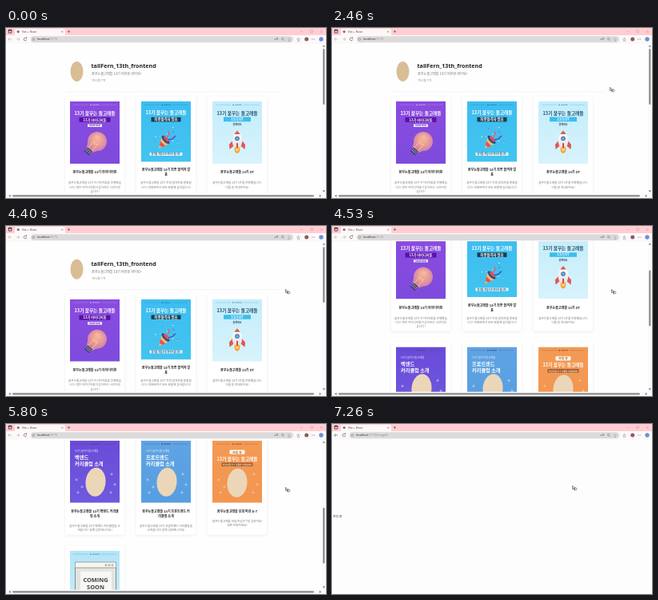
Animation of 400 by 213 pixels, one loop 8 s. Source, as an HTML page with a canvas:

```html
<!DOCTYPE html>
<html lang="ko">
<head>
<meta charset="utf-8">
<title>Vite + React</title>
<style>
html, body { margin: 0; width: 100%; height: 100%; overflow: hidden; background: #fff; }
canvas { display: block; width: 400px; height: 213px; }
</style>
</head>
<body>
<canvas id="stage"></canvas>
<script>
const W = 400, H = 213, LOOP = 8000, STEP = 1000 / 15;
const KR = '"Noto Sans CJK KR", "Noto Sans CJK", "Noto Sans", sans-serif';
const UI = '"Open Sans", "Noto Sans", sans-serif';
const CLUB = '꿈꾸는돌고래들', CLUB_SPACED = '13기 꿈꾸는 돌고래들';
const COLS = [111, 200, 289], ROWS = [92, 230, 368], CARD_H = [124, 124, 113];
const IMG_W = 62, IMG_H = 78, TOP = 19, BOTTOM = 270;

const canvas = document.getElementById('stage');
const dpr = window.devicePixelRatio || 1;
canvas.width = W * dpr;
canvas.height = H * dpr;
const c = canvas.getContext('2d');

// ---------- helpers ----------
function rect(x, y, w, h, fill, r = 0) {
  c.fillStyle = fill;
  c.beginPath();
  if (r) c.roundRect(x, y, w, h, r); else c.rect(x, y, w, h);
  c.fill();
}
function oval(x, y, rx, ry, fill, turn = 0) {
  c.fillStyle = fill;
  c.beginPath();
  c.ellipse(x, y, rx, ry, turn, 0, Math.PI * 2);
  c.fill();
}
function poly(pts, fill) {
  c.fillStyle = fill;
  c.beginPath();
  pts.forEach(([x, y]) => c.lineTo(x, y));
  c.closePath();
  c.fill();
}
function line(pts, color, width = 0.6) {
  c.strokeStyle = color;
  c.lineWidth = width;
  c.beginPath();
  pts.forEach(([x, y], i) => i ? c.lineTo(x, y) : c.moveTo(x, y));
  c.stroke();
}
function ring(x, y, r, color, width = 0.6, from = 0, to = Math.PI * 2) {
  c.strokeStyle = color;
  c.lineWidth = width;
  c.beginPath();
  c.arc(x, y, r, from, to);
  c.stroke();
}
function text(s, x, y, size, color, { weight = 400, align = 'center', font = KR } = {}) {
  c.font = `${weight} ${size}px ${font}`;
  c.textAlign = align;
  c.textBaseline = 'alphabetic';
  c.fillStyle = color;
  c.fillText(s, x, y + size * 0.36);
  return c.measureText(s).width;
}
function fade(y, h, from, to) {
  const g = c.createLinearGradient(0, y, 0, y + h);
  g.addColorStop(0, from);
  g.addColorStop(1, to);
  return g;
}
function rand(seed) {
  const v = Math.sin(seed * 127.1) * 43758.5453;
  return v - Math.floor(v);
}
const bold = { weight: 700 };

// ---------- motion ----------
// Each move: start, end, value before, value after.
const easeOut = p => 1 - Math.pow(1 - p, 1.8);
const easeBoth = p => p * p * (3 - 2 * p);
function track(t, moves, ease) {
  let v = moves[0][2];
  for (const [a, b, from, to] of moves) {
    if (t >= a) v = from + (to - from) * ease(Math.min(1, (t - a) / (b - a)));
  }
  return v;
}
const scrollAt = t => track(t, [
  [4400, 4733, 0, 130], [5266, 5466, 130, 209], [5800, 6066, 209, BOTTOM]], easeOut);
const pointerX = t => track(t, [
  [333, 600, 392, 347], [3800, 4266, 347, 349], [6533, 6866, 349, 300]], easeBoth);
const pointerY = t => track(t, [
  [333, 600, 2, 74], [3800, 4266, 74, 79], [6533, 6866, 79, 77]], easeBoth);

// ---------- browser frame ----------
function browser(blank) {
  const faint = '#d39ba2';
  rect(0, 0, W, 9.5, '#ffcdd2');
  rect(2.8, 1.8, 4.6, 4.6, '#4a3338', 1);
  rect(3.7, 3.6, 2.8, 2, '#ffe3e6');
  rect(11, 1, 63, 10, '#fdf7f7', 2);
  oval(15.2, 4.6, 1.6, 1.6, '#77708c');
  text('Vite + React', 20, 4.6, 3.4, '#444', { align: 'left', font: UI });
  line([[69.2, 3.6], [71.2, 5.6]], '#555', 0.5);
  line([[71.2, 3.6], [69.2, 5.6]], '#555', 0.5);
  line([[76.8, 4.4], [80.2, 4.4]], '#644');
  line([[78.5, 2.7], [78.5, 6.1]], '#644');
  line([[368, 4.4], [371, 4.4]], faint);
  c.strokeRect(380.8, 3, 2.6, 2.6);
  line([[392.8, 3], [395.8, 6]], faint);
  line([[395.8, 3], [392.8, 6]], faint);

  rect(0, 9, W, 10, '#fdf9f9');
  const arrow = blank ? '#555' : '#aaa';
  line([[7, 14], [2.8, 14]], arrow);
  line([[4.7, 12.1], [2.8, 14], [4.7, 15.9]], arrow);
  const shift = blank ? -9 : 0;
  if (!blank) {
    line([[13, 14], [17, 14]], arrow);
    line([[15.2, 12.1], [17, 14], [15.2, 15.9]], arrow);
  }
  ring(24 + shift, 14, 1.8, '#444', 0.6, 0.2, 5.4);
  poly([[24.8 + shift, 11.8], [26.2 + shift, 11.6], [26 + shift, 13.4]], '#444');

  rect(31 + shift, 10.2, 328 - shift, 7.8, '#dcdadb', 3.9);
  ring(34.5 + shift, 14.1, 1.4, '#666', 0.5);
  const w = text('localhost', 39 + shift, 14.1, 3.7, '#222', { align: 'left', font: UI });
  text(blank ? ':5173/image/2' : ':5173', 39 + shift + w, 14.1, 3.7, '#888', { align: 'left', font: UI });
  text('aあ', 338, 14, 3.4, '#666');
  ring(345.7, 13.6, 1.3, '#666', 0.5);
  line([[346.7, 14.6], [347.9, 15.8]], '#666', 0.5);
  text('☆', 354, 14, 4.4, '#666');

  text('☆', 365.5, 14, 5, '#444', bold);
  oval(375.7, 14, 2.5, 2.5, '#8d5a60');
  for (let i = 0; i < 3; i++) oval(382.4 + i * 1.6, 14, 0.45, 0.45, '#444');
  oval(394, 14, 2.7, 2.7, '#6f8fd6');
  line([[0, 18.9], [W, 18.9]], '#eeeaea', 0.4);
}

function scrollbars(y) {
  rect(394.5, TOP, 5.5, 189, '#fafafa');
  poly([[395.6, 23.6], [399, 23.6], [397.3, 21.4]], '#777');
  poly([[395.6, 203.6], [399, 203.6], [397.3, 205.8]], '#777');
  rect(396.2, 26 + y * 0.377, 2.2, 70, '#8b8b8b', 1.1);
  rect(0, 207.8, W, 5.2, '#fafafa');
  poly([[5.6, 208.7], [5.6, 212], [3.4, 210.3]], '#777');
  poly([[391.8, 208.7], [391.8, 212], [394, 210.3]], '#777');
  rect(8, 209.2, 377, 2.2, '#8b8b8b', 1.1);
}

// ---------- posters: x is the centre, y the top ----------
function backdrop(x, y, from, to, h = IMG_H) {
  rect(x - 31, y, IMG_W, h, fade(y, h, from, to));
}
function topLine(x, y, color) {
  line([[x - 27, y + 4.3], [x - 8, y + 4.3]], color, 0.3);
  line([[x + 8, y + 4.3], [x + 27, y + 4.3]], color, 0.3);
  oval(x - 5, y + 4.3, 0.9, 0.9, color);
  line([[x - 3, y + 4.3], [x + 6, y + 4.3]], color, 0.8);
}
function headline(x, y, color) {
  text(CLUB_SPACED, x, y, 5.7, color, bold);
}
function label(s, x, y, w, h, bg, fg, size, r = 0.5) {
  rect(x - w / 2, y - h / 2, w, h, bg, r);
  text(s, x, y, size, fg, bold);
}
function specks(x, y, n, seed, colors, x0, y0, w, h) {
  for (let i = 0; i < n; i++) {
    const px = x + x0 + rand(seed + i) * w, py = y + y0 + rand(seed + i + 50) * h;
    oval(px, py, 0.9, 0.5, colors[i % colors.length], rand(i) * 3);
  }
}

function ideaPoster(x, y) {
  backdrop(x, y, '#8b4be0', '#7d4bdc');
  topLine(x, y, '#c9aef2');
  headline(x, y + 14.5, '#fff');
  label('13기 아이디어톤', x, y + 23, 39, 6, '#5a12a6', '#fff', 4.2);
  label('IDEATHON', x, y + 30.3, 18, 3.4, '#f4ecff', '#4b2a8a', 2.6);
  c.save();
  c.translate(x + 3, y + 50);
  c.rotate(0.72);
  poly([[-9, 7], [9, 7], [4.5, 15], [-4.5, 15]], '#d889a0');
  const g = c.createRadialGradient(-3, -4, 1, 0, 0, 13);
  g.addColorStop(0, '#f6b99a');
  g.addColorStop(0.55, '#e79a9c');
  g.addColorStop(1, '#cf7fae');
  oval(0, 0, 12, 12, g);
  line([[-3, 13], [-3, 2], [0, 5], [3, 2], [3, 13]], '#ffd36b', 0.8);
  rect(-4.5, 13.5, 9, 6.5, '#463f70', 1.6);
  line([[-4.5, 15.5], [4.5, 15.5]], '#b9b2da', 0.8);
  line([[-4.5, 17.7], [4.5, 17.7]], '#b9b2da', 0.8);
  c.restore();
}

function resultPoster(x, y) {
  backdrop(x, y, '#3dbdf0', '#42c4f0', 75.5);
  topLine(x, y, '#1f7fa8');
  headline(x, y + 14.3, '#fff');
  label('최종합격자 발표', x, y + 22.6, 37, 5.6, '#173f54', '#fff', 4.4);
  specks(x, y, 18, 9, ['#ffd84d', '#f2586a', '#fff', '#4d63d8'], -15, 32, 32, 22);
  poly([[x - 9, y + 59], [x - 5, y + 43], [x + 4, y + 53]], '#e8c25a');
  poly([[x - 8, y + 55], [x - 6.8, y + 50], [x - 1, y + 55.5], [x - 5, y + 57.3]], '#e94c5c');
  oval(x - 0.5, y + 48, 6.6, 2.8, '#2f4796', 0.8);
  oval(x + 0.5, y + 47.2, 4.4, 1.7, '#e94c5c', 0.8);
  line([[x + 1, y + 46], [x + 4, y + 41], [x + 3, y + 37]], '#f2586a', 1.1);
  line([[x + 3, y + 48], [x + 8, y + 47], [x + 12, y + 43]], '#4453b8', 1.4);
  label('합격을 진심으로 축하드립니다!', x, y + 66, 41, 3.9, '#eefaff', '#174a66', 2.9, 1);
}

function rocketPoster(x, y) {
  backdrop(x, y, '#c3edfb', '#d8f3fc');
  topLine(x, y, '#5599bb');
  headline(x, y + 14.5, '#24506c');
  label('13기 OT', x, y + 22.4, 34, 5.6, '#3dbdec', '#fff', 4.2);
  text('함께해요', x, y + 29, 3, '#33556b', bold);
  oval(x, y + 60, 3.4, 5, '#ff9d3c');
  oval(x, y + 59, 1.8, 3.4, '#ffe06a');
  for (const s of [-1, 1]) {
    poly([[x + s * 4, y + 47], [x + s * 10, y + 54], [x + s * 9.5, y + 60], [x + s * 4, y + 55.5]], '#e2574c');
  }
  c.fillStyle = fade(y + 37, 20, '#ffffff', '#dfe5f0');
  c.beginPath();
  c.moveTo(x, y + 37);
  c.bezierCurveTo(x + 7.5, y + 42, x + 7.5, y + 51, x + 4.2, y + 57);
  c.lineTo(x - 4.2, y + 57);
  c.bezierCurveTo(x - 7.5, y + 51, x - 7.5, y + 42, x, y + 37);
  c.fill();
  poly([[x, y + 36.5], [x + 3.8, y + 41], [x - 3.8, y + 41]], '#e2574c');
  oval(x, y + 46.5, 2.8, 2.8, '#52658c');
  oval(x, y + 46.5, 1.8, 1.8, '#55bdee');
  rect(x - 1, y + 52, 2, 7, '#d44a43', 1);
}

function flakes(x, y, color) {
  for (const [dx, dy] of [[-23, 49], [-16, 58], [-21, 65], [21, 42], [25, 55], [20, 65]]) {
    oval(x + dx, y + dy, 1.5, 1.5, color);
  }
}
function mascot(x, y) {
  oval(x, y, 12.5, 18, '#ecd6b8', 0.08);
}
function coursePoster(name, from, to) {
  return (x, y) => {
    backdrop(x, y, from, to);
    topLine(x, y, '#4b3b78');
    const left = { weight: 700, align: 'left' };
    text('13기 ' + CLUB, x - 25, y + 13.3, 3.4, '#eef', { align: 'left' });
    text(name, x - 25, y + 20.8, 6.2, '#fff', left);
    text('커리큘럼 소개', x - 25, y + 29.2, 6.2, '#fff', left);
    flakes(x, y, 'rgba(255,255,255,.4)');
    mascot(x + 1, y + 52);
  };
}
function recruitPoster(x, y) {
  backdrop(x, y, '#f49a55', '#f2954f');
  topLine(x, y, '#8a4a26');
  label('모집 중', x, y + 14.4, 19, 5.2, '#fff7ee', '#b5642f', 3.8, 1);
  headline(x, y + 22.8, '#fff');
  label('모집 마감 D-7 서둘러 지원하세요', x, y + 30, 39, 4.6, '#9d5b30', '#ffe7cf', 2.7);
  flakes(x, y, 'rgba(255,235,210,.4)');
  mascot(x, y + 53);
}
function soonPoster(x, y) {
  backdrop(x, y, '#b3e5f8', '#c9edf8');
  topLine(x, y, '#4d8ba6');
  rect(x - 25, y + 14, 52, 54, '#5e6a70', 1);
  rect(x - 24.3, y + 14.7, 50.6, 52.6, '#e2e4e1', 0.6);
  rect(x - 24.3, y + 14.7, 50.6, 6.6, '#f7f5ec');
  line([[x - 24.3, y + 21.3], [x + 26.3, y + 21.3]], '#5e6a70', 0.6);
  for (let i = 0; i < 3; i++) ring(x + 14 + i * 4, y + 18, 1.1, '#5e6a70', 0.5);
  rect(x - 18, y + 26, 39, 34, '#f7f7f4');
  text('COMING', x + 1, y + 37, 7.4, '#3d4347', { weight: 700, font: UI });
  text('SOON', x + 1, y + 46, 7.4, '#3d4347', { weight: 700, font: UI });
}

// ---------- cards: [column, row, poster, title lines, title y, text lines, text y] ----------
const CARDS = [
  [0, 0, ideaPoster, [CLUB + ' 13기 아이디어톤'], 89,
    [CLUB + ' 13기 아이디어톤을 진행했습', '니다. 멋진 아이디어들이 쏟아지는 시간이었', '습니다!'], 102],
  [1, 0, resultPoster, [CLUB + ' 13기 최종 합격자 발', '표'], 85.8,
    [CLUB + ' 13기 최종 합격자를 발표합', '니다~지원해주신 모든 분들께 감사합니다!'], 102],
  [2, 0, rocketPoster, [CLUB + ' 13기 OT'], 89,
    [CLUB + ' 13기 OT를 진행했습니다.', '다들 잘 지내보아요!'], 102],
  [0, 1, coursePoster('백엔드', '#6a4bd9', '#6f59de'), [CLUB + ' 13기 백엔드 커리큘', '럼 소개'], 89,
    [CLUB + ' 13기 백엔드 커리큘럼을 소', '개합니다! 함께 성장해나가요!'], 107],
  [1, 1, coursePoster('프론트엔드', '#5fa4e3', '#579ee0'), [CLUB + ' 13기 프론트엔드 커', '리큘럼 소개'], 89,
    [CLUB + ' 13기 프론트엔드 커리큘럼을', '소개합니다! 함께 성장해나가요!'], 107],
  [2, 1, recruitPoster, [CLUB + ' 모집 마감 D-7'], 89,
    [CLUB + ' 모집 마감이 7일 남았어요!', '얼른 지원하세요!'], 101],
  [0, 2, soonPoster, [CLUB + ' 13기 모집 예정'], 89,
    [CLUB + ' 13기 모집이 곧 시작됩니다!'], 100],
];

function card([col, row, poster, title, ty, body, by]) {
  const x = COLS[col], y = ROWS[row];
  c.save();
  c.shadowColor = 'rgba(0,0,0,.07)';
  c.shadowBlur = 4 * dpr;
  c.shadowOffsetY = dpr;
  rect(x - 37, y - 6, 74, CARD_H[row], '#fff', 2.5);
  c.restore();
  c.save();
  c.beginPath();
  c.rect(x - 31, y, IMG_W, IMG_H);
  c.clip();
  poster(x, y);
  c.restore();
  title.forEach((s, i) => text(s, x, y + ty + i * 6, 4.05, '#222', bold));
  body.forEach((s, i) => text(s, x, y + by + i * 5.3, 3.6, '#777'));
}

function page(scroll) {
  c.save();
  c.beginPath();
  c.rect(0, TOP, W, 189);
  c.clip();
  c.translate(0, -scroll);
  oval(88.5, 54.5, 8, 12.5, '#d8bd95');
  const left = { align: 'left' };
  text('tallFern_13th_frontend', 106.5, 47.8, 7.15, '#222', { weight: 700, align: 'left', font: UI });
  text(CLUB + ' 13기 여러분 화이팅!', 107, 58, 4.15, '#777', left);
  text('게시물 7개', 107, 65.5, 3.9, '#999', left);
  line([[76, 80], [341, 80]], '#e9e9e9', 0.5);
  CARDS.forEach(card);
  c.restore();
}

function pointer(x, y) {
  c.save();
  c.translate(x, y);
  poly([[0, 0], [0.4, 5], [1.8, 4], [2.8, 6], [3.8, 5.4], [2.9, 3.6], [4.5, 3.2]], '#444');
  poly([[0.6, 1.1], [0.9, 3.9], [1.9, 3.2], [3.1, 5.2], [2.3, 3.1], [3.3, 2.9]], '#fff');
  ring(4.4, 4.4, 1.5, '#666', 0.8);
  c.restore();
}

function draw(now) {
  const t = Math.floor((now % LOOP + 7) / STEP) * STEP + 0.5;
  const blank = t >= 7066;
  c.setTransform(dpr, 0, 0, dpr, 0, 0);
  rect(0, 0, W, H, blank ? '#fdfdfd' : '#fefefe');
  if (blank) {
    text('로딩 중', 1.2, 116, 3.8, '#333', { align: 'left' });
  } else {
    const y = scrollAt(t);
    page(y);
    scrollbars(y);
  }
  browser(blank);
  if (t >= 333) pointer(pointerX(t), pointerY(t));
}

const start = performance.now();
function tick() {
  draw(performance.now() - start);
  requestAnimationFrame(tick);
}
tick();
</script>
</body>
</html>
```
